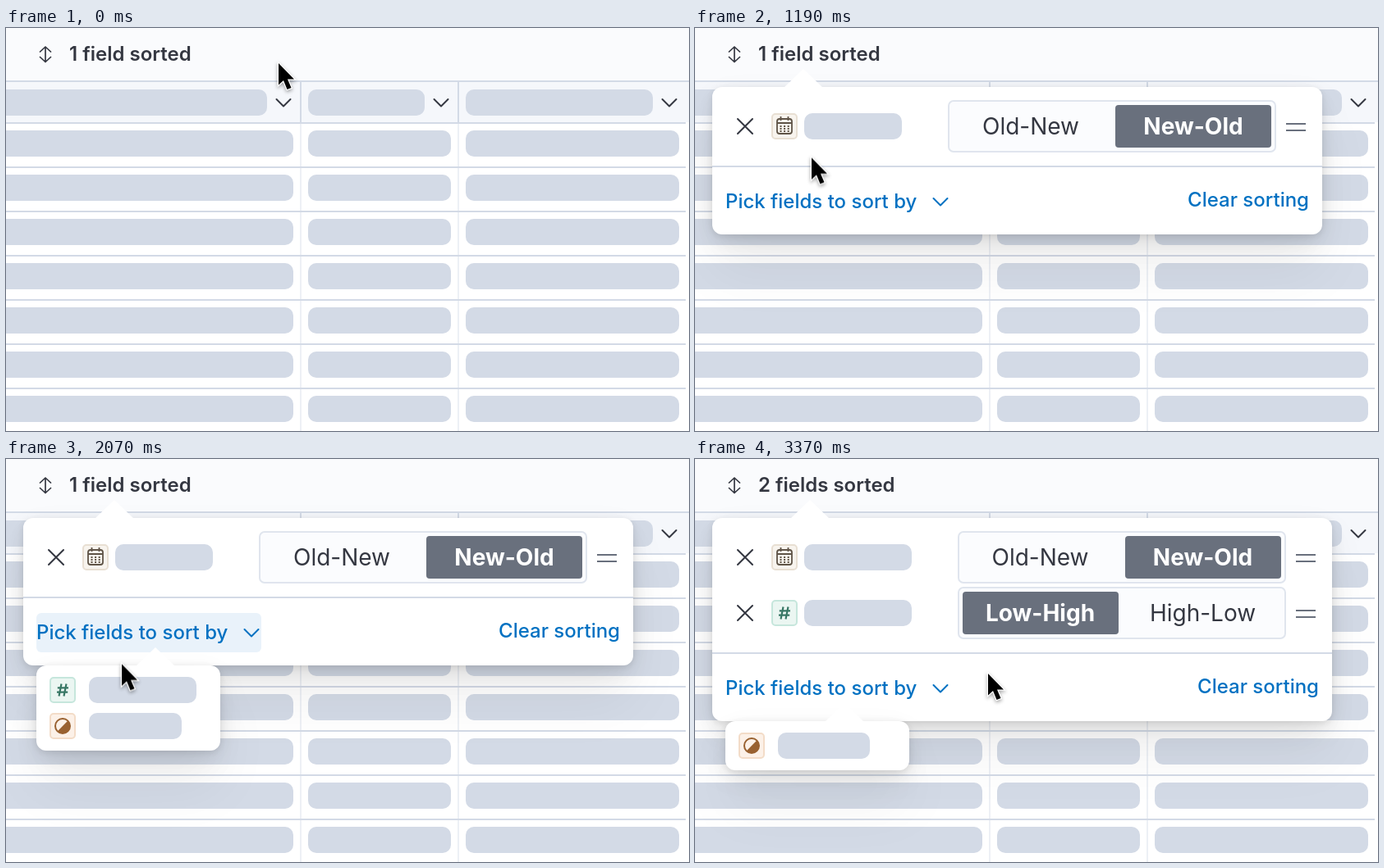
An HTML page for the animation above (4040 ms loop, 832x492 px).

```html
<!DOCTYPE html>
<html lang="en">
<head>
<meta charset="utf-8">
<title>Sorting fields</title>
<style>
  html, body { margin: 0; width: 100%; height: 100%; overflow: hidden; background: #fff; }
  #stage { position: relative; width: 832px; height: 492px; overflow: hidden; }
  #stage svg, .layer { position: absolute; left: 0; top: 0; width: 832px; height: 492px; }
  #stage svg { overflow: visible; }

  text { font: 500 24px Inter, "Liberation Sans", sans-serif; white-space: pre; }
  .title { font-weight: 600; fill: #343741; }
  .link { fill: #0071c2; }
  .choice { font-size: 28px; font-weight: 400; fill: #343741; text-anchor: middle; }
  .picked { font-weight: 700; fill: #fff; }
  .pill { fill: #d3dae6; }
  .ink { fill: none; stroke: #343741; stroke-width: 2; stroke-linecap: round; stroke-linejoin: round; }
  .blue { stroke: #0071c2; }
  .rule { fill: #d3dae6; }
  .soft { fill: #edf0f5; }
  .group { fill: #fbfcfe; stroke: #e0e5ee; stroke-width: 2; }
  .chosen { fill: #69707d; }
  .tip { fill: #fff; }

  .card {
    position: absolute; border-radius: 12px; background: #fff;
    box-shadow: 0 2px 10px rgba(0,0,0,.1), 0 7px 26px rgba(0,0,0,.07),
                0 17px 46px rgba(0,0,0,.06), 0 46px 70px rgba(0,0,0,.05);
  }

  /* One loop is 4040 ms; percentages are ms / 40.4. */
  .before, .after, .under, .wash, #hand, #arrow { animation: 4040ms step-end infinite; }
  .before { animation-name: before; }
  .after { animation-name: after; }
  #main, #menu { animation: 4040ms cubic-bezier(.34,1.61,.7,1) infinite; }
  #main { animation-name: main; }
  #menu { animation-name: menu; }
  #titleWash { animation-name: title-wash; }
  #titleLine { animation-name: title-line; }
  #pickWash { animation-name: pick-wash; }
  .pickLine { animation-name: pick-line; }
  #hand { animation-name: hand; }
  #arrow { animation-name: arrow; }
  #cursor { animation: travel 4040ms infinite; }

  @keyframes before { 0% { opacity: 1 } 57.5% { opacity: 0 } }
  @keyframes after { 0% { opacity: 0 } 57.5% { opacity: 1 } }
  @keyframes main {
    0%, 14.4% { opacity: 0; transform: translateY(16px) }
    19.8%, 100% { opacity: 1; transform: none }
  }
  @keyframes menu {
    0%, 41.38% { opacity: 0; transform: translateY(16px) }
    47.57%, 100% { opacity: 1; transform: none }
  }
  @keyframes title-wash { 0% { opacity: 0 } 14.2% { opacity: 1 } 23.5% { opacity: 0 } }
  @keyframes title-line { 0% { opacity: 0 } 6.7% { opacity: 1 } 23.5% { opacity: 0 } }
  @keyframes pick-wash { 0% { opacity: 0 } 40.4% { opacity: 1 } 57.5% { opacity: 0 } }
  @keyframes pick-line {
    0% { opacity: 0 } 32.2% { opacity: 1 } 50% { opacity: 0 }
    57.5% { opacity: 1 } 76.8% { opacity: 0 }
  }
  @keyframes hand {
    0% { opacity: 0 } 6.7% { opacity: 1 } 23.5% { opacity: 0 } 32.2% { opacity: 1 }
    50% { opacity: 0 } 53% { opacity: 1 } 76.8% { opacity: 0 }
  }
  @keyframes arrow {
    0% { opacity: 1 } 6.7% { opacity: 0 } 23.5% { opacity: 1 } 32.2% { opacity: 0 }
    50% { opacity: 1 } 53% { opacity: 0 } 76.8% { opacity: 1 }
  }
  @keyframes travel {
    0%, 1.733% { transform: translate(332px, 43px); animation-timing-function: cubic-bezier(.4,.1,.4,1) }
    12.871% { transform: translate(144px, 40px) }
    21.04% { transform: translate(144px, 40px); animation-timing-function: cubic-bezier(.4,0,.8,.8) }
    29.455% { transform: translate(142px, 158px); animation-timing-function: cubic-bezier(.2,.5,.4,1) }
    38.119% { transform: translate(140px, 205px) }
    45.792% { transform: translate(140px, 205px); animation-timing-function: cubic-bezier(.4,0,.8,.8) }
    51.238% { transform: translate(141px, 250px); animation-timing-function: cubic-bezier(.2,.5,.4,1) }
    54.95% { transform: translate(142px, 272px) }
    69.307% { transform: translate(142px, 272px); animation-timing-function: cubic-bezier(.4,0,.3,1) }
    83.416%, 100% { transform: translate(357px, 262px) }
  }
</style>
</head>
<body>
<div id="stage">

<svg viewBox="0 0 832 492">
  <defs>
    <g id="row">
      <rect class="soft" x="358" y="117" width="2" height="52"/>
      <rect class="soft" x="550" y="117" width="2" height="52"/>
      <rect class="pill" x="-30" y="125" width="380" height="32" rx="10"/>
      <rect class="pill" x="368" y="125" width="174" height="32" rx="10"/>
      <rect class="pill" x="560" y="125" width="260" height="32" rx="10"/>
      <rect class="rule" y="169" width="828" height="2"/>
    </g>
    <path id="chevron" d="M-8.5-4 0 4.5 8.5-4"/>
    <path id="cross" class="ink" d="M52 111 70 129M70 111 52 129"/>
    <path id="grip" d="M0 117H24M0 125H24" stroke="#69707d" stroke-width="2"/>
    <g id="date">
      <rect x="1" y="1" width="30" height="30" rx="4" fill="#f8f4ee" stroke="#e8dfd3" stroke-width="2"/>
      <g fill="none" stroke="#5f5447" stroke-width="1.8">
        <rect x="7" y="7" width="18" height="18" rx="3"/>
        <path d="M7 12H25M11.5 4V9M20.5 4V9"/>
        <path d="M10.5 16H22M10.5 19H22M10.5 22H22" stroke-dasharray="2 2.6"/>
      </g>
    </g>
    <g id="number">
      <rect x="1" y="1" width="30" height="30" rx="4" fill="#ebf6f2" stroke="#c6e6dc" stroke-width="2"/>
      <path d="M14.5 8.5 11.5 23.5M20.5 8.5 17.5 23.5M9.8 13.3H23M9 18.7H22.2" fill="none" stroke="#387765" stroke-width="2.2"/>
    </g>
    <g id="flag">
      <rect x="1" y="1" width="30" height="30" rx="4" fill="#fcf1e8" stroke="#f3dcc8" stroke-width="2"/>
      <circle cx="16" cy="16" r="9" fill="none" stroke="#996130" stroke-width="2"/>
      <path d="M22.4 9.6A9 9 0 0 1 9.6 22.4Z" fill="#996130"/>
    </g>
  </defs>

  <rect width="832" height="492" fill="#fff"/>
  <rect width="832" height="64" fill="#fafbfd"/>
  <rect y="66" width="832" height="49" fill="#f5f7fb"/>
  <rect class="rule" y="64" width="832" height="2"/>
  <rect class="rule" y="115" width="828" height="2"/>
  <rect class="rule" x="358" y="66" width="2" height="50"/>
  <rect class="rule" x="550" y="66" width="2" height="50"/>
  <rect class="pill" x="-30" y="75" width="348" height="32" rx="10"/>
  <rect class="pill" x="368" y="75" width="142" height="32" rx="10"/>
  <rect class="pill" x="560" y="75" width="228" height="32" rx="10"/>
  <g class="ink">
    <use href="#chevron" x="338" y="91"/>
    <use href="#chevron" x="530" y="91"/>
    <use href="#chevron" x="808" y="91"/>
  </g>
  <use href="#row"/>
  <use href="#row" y="54"/>
  <use href="#row" y="108"/>
  <use href="#row" y="162"/>
  <use href="#row" y="216"/>
  <use href="#row" y="270"/>
  <use href="#row" y="324"/>

  <rect id="titleWash" class="wash" x="21" y="8" width="222" height="48" rx="6" fill="#ebecf0"/>
  <path class="ink" style="stroke-width:1.7" d="M48 23.5V40.500M41.500 29 48 23 54.500 29M41.500 35.500 48 41.500 54.500 35.500"/>
  <g class="before">
    <text class="title" x="77" y="40">1 field sorted</text>
    <rect id="titleLine" class="under" x="77" y="42" width="150" height="2" fill="#343741"/>
  </g>
  <text class="title after" x="77" y="40">2 fields sorted</text>
</svg>

<div id="main" class="layer">
  <div class="layer before">
    <div class="card" style="left:21px;top:72px;width:743px;height:180px"></div>
    <svg viewBox="0 0 832 492">
      <path class="tip" d="M108 73 132 50 156 73Z"/>
      <use href="#cross"/>
      <use href="#date" x="93" y="104"/>
      <rect class="pill" x="133" y="104" width="119" height="32" rx="10"/>
      <rect class="group" x="309" y="89" width="398" height="62" rx="6"/>
      <rect class="chosen" x="512" y="94" width="190" height="52" rx="4"/>
      <text class="choice" x="409" y="130">Old-New</text>
      <text class="choice picked" x="607" y="130">New-Old</text>
      <use href="#grip" x="720"/>
      <rect class="rule" x="21" y="168" width="743" height="2"/>
      <rect id="pickWash" class="wash" x="37" y="188" width="274" height="48" rx="6" fill="#e9f2fa"/>
      <text class="link" x="37" y="220">Pick fields to sort by</text>
      <rect class="under pickLine" x="37" y="222" width="234" height="2" fill="#0071c2"/>
      <use href="#chevron" class="ink blue" x="299" y="212"/>
      <text class="link" x="748" y="218" text-anchor="end">Clear sorting</text>
    </svg>
  </div>
  <div class="layer after">
    <div class="card" style="left:21px;top:72px;width:755px;height:248px"></div>
    <svg viewBox="0 0 832 492">
      <path class="tip" d="M116 73 140 50 164 73Z"/>
      <use href="#cross"/>
      <use href="#cross" y="68"/>
      <use href="#date" x="93" y="104"/>
      <use href="#number" x="93" y="172"/>
      <rect class="pill" x="133" y="104" width="131" height="32" rx="10"/>
      <rect class="pill" x="133" y="172" width="131" height="32" rx="10"/>
      <rect class="group" x="321" y="89" width="398" height="62" rx="6"/>
      <rect class="group" x="321" y="157" width="398" height="62" rx="6"/>
      <rect class="chosen" x="524" y="94" width="190" height="52" rx="4"/>
      <rect class="chosen" x="326" y="162" width="190" height="52" rx="4"/>
      <text class="choice" x="420.500" y="130">Old-New</text>
      <text class="choice picked" x="618.500" y="130">New-Old</text>
      <text class="choice picked" x="420.500" y="198">Low-High</text>
      <text class="choice" x="618.500" y="198">High-Low</text>
      <use href="#grip" x="732"/>
      <use href="#grip" x="732" y="68"/>
      <rect class="rule" x="21" y="236" width="755" height="2"/>
      <text class="link" x="37" y="288">Pick fields to sort by</text>
      <rect class="under pickLine" x="37" y="290" width="234" height="2" fill="#0071c2"/>
      <use href="#chevron" class="ink blue" x="299" y="280"/>
      <text class="link" x="760" y="286" text-anchor="end">Clear sorting</text>
    </svg>
  </div>
</div>

<div id="menu" class="layer">
  <div class="layer before">
    <div class="card" style="left:37px;top:252px;width:224px;height:104px"></div>
    <svg viewBox="0 0 832 492">
      <path class="tip" d="M158 253 182 230 206 253Z"/>
      <use href="#number" x="53" y="266"/>
      <use href="#flag" x="53" y="310"/>
      <rect class="pill" x="101" y="266" width="131" height="32" rx="10"/>
      <rect class="pill" x="101" y="310" width="113" height="32" rx="10"/>
    </svg>
  </div>
  <div class="layer after">
    <div class="card" style="left:37px;top:320px;width:224px;height:60px"></div>
    <svg viewBox="0 0 832 492">
      <path class="tip" d="M158 321 182 298 206 321Z"/>
      <use href="#flag" x="53" y="334"/>
      <rect class="pill" x="101" y="334" width="112" height="32" rx="10"/>
    </svg>
  </div>
</div>

<div id="cursor" class="layer">
  <svg viewBox="0 0 832 492" style="filter:drop-shadow(0 2px 2px rgba(0,0,0,.35))">
    <path id="arrow" d="M0 0V26.500L6 21 10.500 32 15.500 30 11 19.500H19Z" fill="#000" stroke="#fff" stroke-width="2.500" paint-order="stroke"/>
    <g id="hand" transform="translate(-8 -1)" stroke="#000" stroke-width="2" stroke-linejoin="round" stroke-linecap="round">
      <path fill="#fff" d="M6.500 4C5.500 .500 10 -.500 11 3L13.500 12C14 9.500 18 10 18.500 12.500 19.500 10.800 23 11.500 23.500 14 25 12.800 28 14 28 17 28.500 22 27.500 25 25.500 28V32H12.500C11 27.500 7 24.500 2.500 19.500 0 16.500 3 13.500 6 15.500L9.500 18Z"/>
      <path fill="none" d="M14.500 20V26.500M18.500 20V26.500M22.500 20V26.500"/>
    </g>
  </svg>
</div>

</div>
</body>
</html>
```
